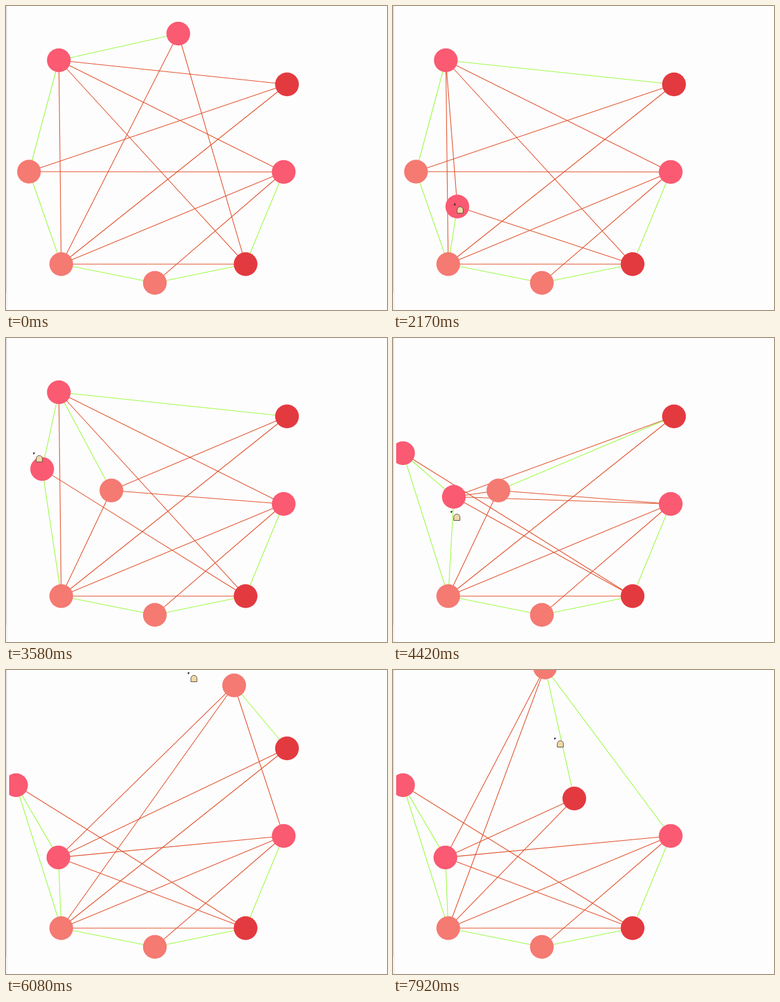
An HTML page with a canvas that plays this animation: 600x479 px, repeating every 8000 ms.

```html
<!DOCTYPE html>
<html lang="en">
<head>
<meta charset="utf-8">
<title>Untangle the graph</title>
<style>
  html, body { margin: 0; width: 100%; height: 100%; overflow: hidden; background: #fefdfe; }
  canvas { display: block; }
</style>
</head>
<body>
<canvas id="stage" width="600" height="479"></canvas>
<script>
const ctx = document.getElementById('stage').getContext('2d');
const LOOP = 8000, STEP = 1000 / 12, LAG = 110, RADIUS = 18.7;

const PINK = '#fa5a72', RED = '#e33a40', SALMON = '#f47a72';
const CROSSED = '#df5029', CLEAR = '#98fb40';

const node = (x, y, color) => ({ x, y, color });
const nodes = {
  A: node(271.3, 43.5, PINK), B: node(83.2, 85.5, PINK),
  C: node(442.5, 123.5, RED), D: node(437.3, 261.5, PINK),
  E: node(377.3, 406.7, RED), F: node(234.4, 436.3, SALMON),
  G: node(87, 406.7, SALMON), H: node(36.2, 261, SALMON)
};
const edges = 'AB BH HG GF FE ED BC BD BE BG AG AE CH CG HD GD GE FD'.split(' ');

// A drag starts at the node's resting place and passes through a few stops.
const at = (t, x, y) => ({ t, x, y });
const drag = (id, grab, ...stops) => ({ id, grab, stops });
const drags = [
  drag('A', 920, at(1620, 101.3, 316)),
  drag('H', 2540, at(3060, 166, 240.2)),
  drag('A', 3240, at(3473, 57, 206.5), at(3583, 44, 182), at(3830, 15.8, 181.5)),
  drag('B', 4090, at(4307, 95.8, 250.4), at(4620, 82.5, 295.4)),
  drag('H', 5090, at(5390, 365.5, 352), at(5500, 482, 432), at(5750, 567, 330),
    at(5973, 359.5, 24.3), at(6220, 239.4, -4)),
  drag('C', 6750, at(7550, 305, 285), at(7807, 285.5, 202.3), at(7917, 255, 108), at(LOOP, 240, 60))
];

// The pointer travels from each drop to the next grab, resting at first on the dropped node.
function buildPath() {
  const path = [at(830, 290, 20)], rest = {};
  for (const { id, grab, stops } of drags) {
    const from = rest[id] || nodes[id], last = path[path.length - 1];
    if (grab - last.t > 600) path.push(at(grab - 440, last.x, last.y));
    path.push(at(grab, from.x, from.y), ...stops);
    rest[id] = stops[stops.length - 1];
  }
  return path;
}
const path = buildPath();

// Smooth speed through a point, zero where the direction turns back.
function speed(i, k) {
  const [a, b, c] = [path[i - 1], path[i], path[i + 1]];
  if (!a || !c) return 0;
  const u = (b[k] - a[k]) / (b.t - a.t), v = (c[k] - b[k]) / (c.t - b.t);
  return u * v > 0 ? 2 * u * v / (u + v) : 0;
}

function pointer(t) {
  const next = path.findIndex(p => p.t > t);
  const i = next < 0 ? path.length - 2 : Math.max(next - 1, 0);
  const a = path[i], b = path[i + 1], span = b.t - a.t;
  const u = Math.min(1, Math.max(0, (t - a.t) / span));
  const ease = u * u * (3 - 2 * u);
  const along = k => a[k] + (b[k] - a[k]) * ease +
    u * (1 - u) * span * ((1 - u) * speed(i, k) - u * speed(i + 1, k));
  return [along('x'), along('y')];
}

function layout(t) {
  const pos = {};
  for (const id in nodes) pos[id] = [nodes[id].x, nodes[id].y];
  for (const { id, grab, stops } of drags) {
    const drop = stops[stops.length - 1].t;
    if (t - LAG > grab) pos[id] = pointer(Math.min(t - LAG, drop));
  }
  return pos;
}

const side = (a, b, c) => (b[0] - a[0]) * (c[1] - a[1]) - (b[1] - a[1]) * (c[0] - a[0]);

function crosses(e, f, pos) {
  if (f.includes(e[0]) || f.includes(e[1])) return false;
  const [a, b, c, d] = [...e, ...f].map(id => pos[id]);
  return side(a, b, c) * side(a, b, d) < 0 && side(c, d, a) * side(c, d, b) < 0;
}

function drawFrameEdge() {
  ctx.fillStyle = '#f5f4f6';
  ctx.fillRect(0, 452, 3, 27);
  ctx.fillStyle = '#dddbe1';
  ctx.fillRect(0, 0, 1.5, 452);
}

function drawGraph(pos) {
  ctx.save();
  ctx.beginPath();
  ctx.rect(5, 0, 595, 479);
  ctx.clip();
  ctx.lineWidth = 1.1;
  for (const e of edges) {
    ctx.strokeStyle = edges.some(f => crosses(e, f, pos)) ? CROSSED : CLEAR;
    ctx.beginPath();
    ctx.moveTo(...pos[e[0]]);
    ctx.lineTo(...pos[e[1]]);
    ctx.stroke();
  }
  for (const id in nodes) {
    ctx.fillStyle = nodes[id].color;
    ctx.beginPath();
    ctx.arc(...pos[id], RADIUS, 0, 2 * Math.PI);
    ctx.fill();
  }
  ctx.restore();
}

function drawPointer([x, y]) {
  ctx.fillStyle = '#222';
  ctx.beginPath();
  ctx.moveTo(x - 1.5, y - 1.5);
  ctx.lineTo(x + 2, y - 1.5);
  ctx.lineTo(x - 0.5, y + 2);
  ctx.fill();
  // Plain rounded badge
  ctx.beginPath();
  ctx.arc(x + 8.5, y + 8, 4.8, Math.PI, 0);
  ctx.lineTo(x + 13.3, y + 13.2);
  ctx.lineTo(x + 3.7, y + 13.2);
  ctx.closePath();
  ctx.fillStyle = '#f0d9a8';
  ctx.fill();
  ctx.lineWidth = 1;
  ctx.strokeStyle = '#5c4f42';
  ctx.stroke();
}

const start = performance.now();

function draw() {
  const now = (performance.now() - start) % LOOP;
  const t = Math.floor((now + 4) / STEP) * STEP % LOOP;
  ctx.fillStyle = '#fefdfe';
  ctx.fillRect(0, 0, 600, 479);
  drawFrameEdge();
  drawGraph(layout(t));
  if (t > path[0].t) drawPointer(pointer(t));
  requestAnimationFrame(draw);
}
draw();
</script>
</body>
</html>
```
